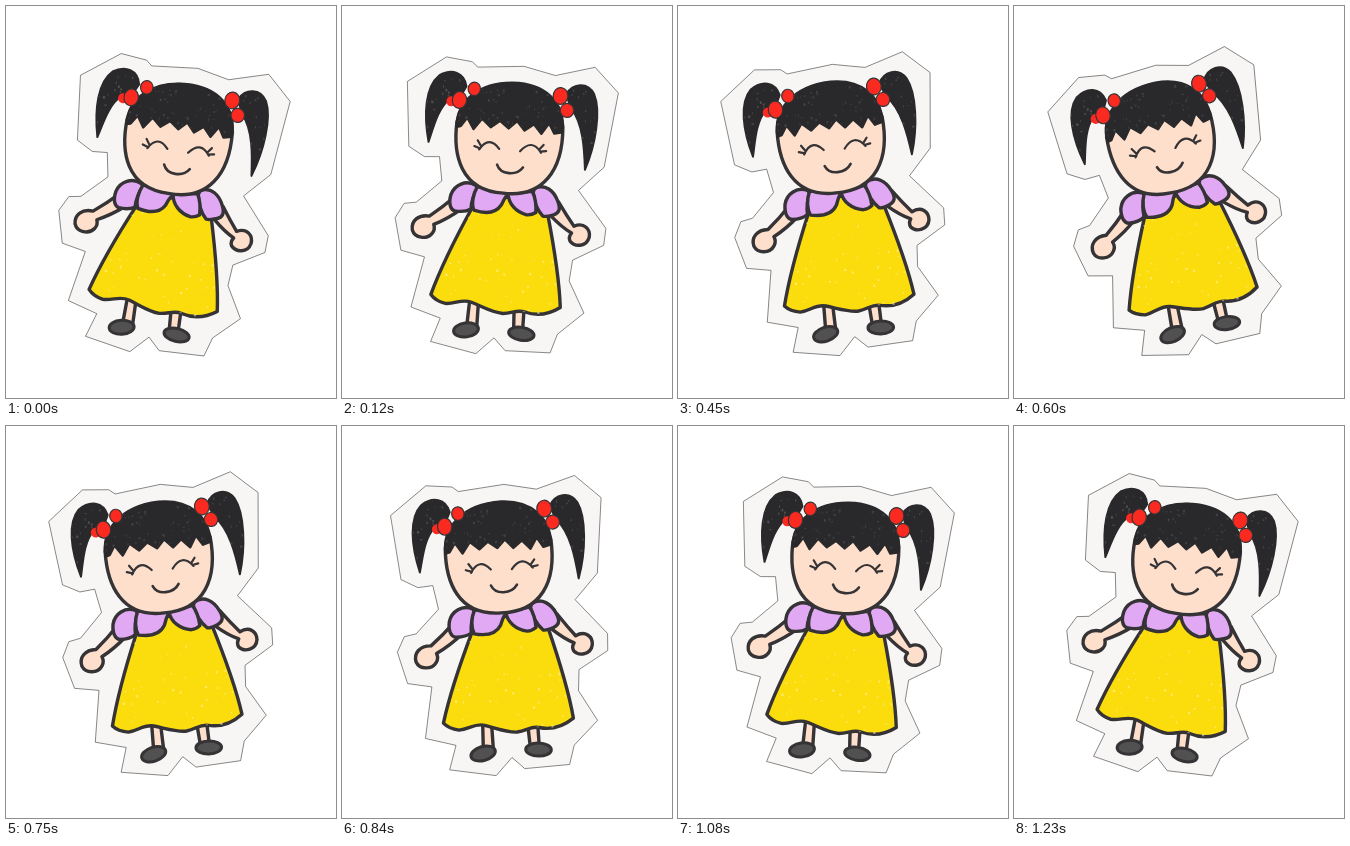
Recreate the animation shown at these times as an HTML page with a canvas. Size 330x392 px, loop 1260 ms.

```html
<!DOCTYPE html>
<html>
<head>
<meta charset="utf-8">
<style>
html, body { margin: 0; width: 100%; height: 100%; overflow: hidden; background: #fff; }
canvas { display: block; }
</style>
</head>
<body>
<canvas id="stage" width="330" height="392"></canvas>
<script>
const ctx = document.getElementById('stage').getContext('2d');
const INK = '#353335', HAIR = '#29282a', SKIN = '#fddfcb', RED = '#fb2a20';
const LILAC = '#e1a8f3', YELLOW = '#fbdc0c', PAPER = '#f8f6f5', SHOE = '#525152';
const PIVOT = [158, 203];
const STEP = 30, STEPS = 42;

function paint(path, fill, width = 3.4, stroke = INK) {
  if (fill) { ctx.fillStyle = fill; ctx.fill(path); }
  if (width) { ctx.strokeStyle = stroke; ctx.lineWidth = width; ctx.stroke(path); }
}
const shape = (d, fill, width, stroke) => paint(new Path2D(d), fill, width, stroke);

function oval(x, y, rx, ry, fill, width, turn = 0) {
  const path = new Path2D();
  path.ellipse(x, y, rx, ry, turn, 0, 7);
  paint(path, fill, width);
}

// Small crayon gaps scattered inside a clip path
function specks(clip, [x, y, w, h], count, color, seed) {
  const random = () => (seed = (seed * 16807) % 2147483647) / 2147483647;
  ctx.save();
  ctx.clip(new Path2D(clip));
  ctx.fillStyle = color;
  for (let i = 0; i < count; i++) {
    ctx.fillRect(x + random() * w, y + random() * h, 0.7 + random() * 1.6, 0.7 + random() * 2);
  }
  ctx.restore();
}

const CUTOUT = 'M57 82 L94 55 L120 58 L126 63 L172 59 L204 66 L243 55 L268 79 L259 154 L235 179' +
  ' L265 215 L264 232 L234 249 L232 270 L249 301 L224 324 L218 343 L173 344 L161 332 L144 349' +
  ' L98 340 L106 316 L76 307 L86 256 L62 251 L54 219 L62 204 L74 202 L98 179 L94 155 L79 156 L63 147 Z';
const DRESS = 'M130 204 C118 230 104 262 95 293 Q100 299 110 301 C120 301 126 295 136 298' +
  ' C148 302 158 307 168 307 C178 306 182 302 190 304 Q208 309 225 297' +
  ' C222 268 214 235 206 205 L196 196 L166 190 Z';
const CAP = 'M109 124 C107 99 128 76 168 76 C199 77 216 96 215 122 L207 124 L201 114 L194 125' +
  ' L186 116 L177 123 L169 114 L161 122 L152 115 L143 122 L134 114 L126 125 L119 114 L113 123 Z';
const LEFT_TAIL = 'M116 83 C113 69 100 66 88 74 C75 86 75 113 82 141 C86 126 89 107 100 97 L110 95 Z';
const RIGHT_TAIL = 'M216 84 C222 72 237 70 244 82 C252 98 249 132 240 158 C238 138 235 112 222 98 Z';

function limbs() {
  shape('M134 299 L133 321 L143 321 L143 299', SKIN);
  shape('M179 301 L180 322 L189 322 L189 301', SKIN);
  oval(132.5, 326, 12.5, 7, SHOE, 3, -0.2);
  oval(188, 326, 12.8, 6.5, SHOE, 3, 0.09);
  shape('M112 194 Q101 205 88 215 C77 214 70 221 72 230 C75 238 87 239 92 232 Q95 228 93 223 Q107 216 119 206 Z', SKIN);
  shape('M216 192 Q225 205 233 215 C243 210 250 217 249 225 C247 235 235 236 230 230 Q228 226 231 222 Q221 217 210 207 Z', SKIN);
}

function clothes() {
  shape(DRESS, YELLOW);
  specks(DRESS, [108, 250, 112, 54], 30, 'rgba(255,250,210,.5)', 41);
  specks(DRESS, [120, 205, 84, 70], 14, 'rgba(255,248,190,.4)', 97);
  shape('M132 181 C122 176 111 182 108 192 C106 202 109 207 113 208 Q123 209 129 205 Q129 193 134 184 Z', LILAC);
  shape('M191 180 C202 174 211 182 215 191 C219 199 217 203 212 205 Q204 208 201 207 Q192 198 190 184 Z', LILAC);
  shape('M134 182 C130 190 129 200 132 206 Q152 211 159 199 Q161 193 165 187 Z', LILAC);
  shape('M165 187 C166 197 174 205 185 207 Q190 207 194 204 Q194 192 189 183 Z', LILAC);
}

function face() {
  shape('M109 119 C107 152 117 187 160 187 C200 189 218 160 215 117 C210 90 189 77 164 77 C132 78 112 97 109 119 Z', SKIN);
  shape('M133 145 Q142 130 153 143 M134 144 L128 142 M135 142 L131 136' +
    ' M174 144 Q185 130 195 144 M194 143 L200 142 M193 141 L197 136', null, 2.2);
  shape('M152 159 C156 169 172 169 178 160', null, 2.6);
}

function hair() {
  shape(LEFT_TAIL, HAIR, 2, HAIR);
  shape(RIGHT_TAIL, HAIR, 2, HAIR);
  shape(CAP, HAIR, 2.5, HAIR);
  specks(CAP, [110, 78, 104, 46], 60, 'rgba(255,255,255,.1)', 13);
  specks(LEFT_TAIL, [76, 70, 36, 60], 20, 'rgba(255,255,255,.18)', 29);
  specks(RIGHT_TAIL, [220, 74, 28, 60], 18, 'rgba(255,255,255,.15)', 53);
  oval(102, 99, 5, 5, RED, 0);
  oval(110, 97, 7.2, 8.5, RED, 1.2);
  oval(124, 85, 6.2, 6.8, RED, 1.2);
  oval(210.5, 86, 7.4, 8.4, RED, 1.2);
  oval(218, 100, 6.8, 7, RED, 1.2);
}

// One degree per step; the swing back pauses for a single step
function tilt(step) {
  const pose = step > 36 ? step - 1 : step;
  return Math.abs(pose - 20) - 10;
}

function draw(now) {
  const step = Math.floor(now / STEP) % STEPS;
  ctx.setTransform(1, 0, 0, 1, 0, 0);
  ctx.fillStyle = '#fff';
  ctx.fillRect(0, 0, 330, 392);
  ctx.translate(...PIVOT);
  ctx.rotate((tilt(step) - 2) * Math.PI / 180);
  ctx.translate(-PIVOT[0], -PIVOT[1]);
  ctx.lineJoin = ctx.lineCap = 'round';
  shape(CUTOUT, PAPER, 0.7, 'rgba(40,40,40,.75)');
  limbs();
  clothes();
  face();
  hair();
}

let start;
function loop(now) {
  start ??= now;
  draw(now - start);
  requestAnimationFrame(loop);
}
draw(0);
requestAnimationFrame(loop);
</script>
</body>
</html>
```
